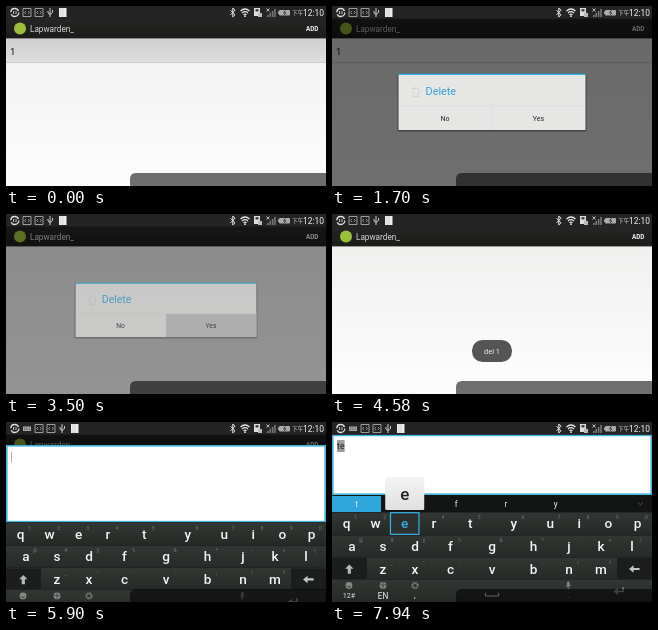
These frames come from a looping animation (320 px wide and 180 px high, 8 s). An HTML page:

```html
<!DOCTYPE html>
<html lang="en">
<head>
<meta charset="utf-8">
<title>Deleting and adding a user</title>
<style>
html, body { margin: 0; width: 100%; height: 100%; overflow: hidden; background: #000; }
svg { display: block; width: 100vw; height: 100vh; }
text { font-family: Roboto, "Noto Sans", sans-serif; }
</style>
</head>
<body>
<svg id="stage" viewBox="0 0 320 180" xmlns="http://www.w3.org/2000/svg"></svg>
<script>
const LOOP = 8000, STEP = 120, HOLD = 500;
const BLUE = "#33b5e5", COL = 320 / 11;

const rect = (x, y, w, h, fill, more = "") =>
  `<rect x="${x}" y="${y}" width="${w}" height="${h}" fill="${fill}" ${more}/>`;
const text = (x, y, size, fill, str, more = "") =>
  `<text x="${x}" y="${y}" font-size="${size}" fill="${fill}" ${more}>${str}</text>`;
const mid = (x, y, size, fill, str, more = "") =>
  text(x, y, size, fill, str, `text-anchor="middle" ${more}`);
const line = (d, color, width = 1, more = "") =>
  `<path d="${d}" fill="none" stroke="${color}" stroke-width="${width}" ${more}/>`;
const shape = (d, fill) => `<path d="${d}" fill="${fill}"/>`;
const group = (id, body, more = "") => `<g id="${id}" ${more}>${body}</g>`;
const grad = (id, from, to) =>
  `<linearGradient id="${id}" x2="0" y2="1"><stop stop-color="${from}"/><stop offset="1" stop-color="${to}"/></linearGradient>`;

function codeIcon(x) {
  return line(`M${x} 2.5h8v8h-8z`, "#aaa", .9) +
    line(`M${x + 3} 5l-1.5 1.5l1.5 1.5M${x + 5} 5l1.5 1.5l-1.5 1.5`, "#aaa", .8);
}

function statusBar() {
  const notices = codeIcon(17) + codeIcon(29) +
    line("M44 2v9M42 5v2l2 1.5M46.5 4v2.5l-2.5 2", "#ddd", .9) +
    rect(53, 2, 7.5, 9, "#eee") + line("M55 2v9M57 2v9", "#aaa", .4);
  const keyIcon = rect(17, 4.5, 8, 4.5, "#aaa") +
    line("M18 5.9h6M18 7.5h6", "#444", .7, 'stroke-dasharray="1 .7"');
  return rect(0, 0, 320, 12.6, "#232423") +
    `<circle cx="8.8" cy="6.5" r="4" fill="none" stroke="#ddd" stroke-width="1.4" stroke-dasharray="10.5 2"/>` +
    line("M7.6 5v3M10 5v3", "#ddd", .9) +
    group("notices", notices) + group("keyIcon", keyIcon) +
    line("M224.5 4.2l4.5 4.6l-2.2 2.2v-9l2.2 2.2l-4.5 4.6", "#e8e8e8", 1) +
    line("M234.5 5q4.5-4 9 0M236 7q3-2.6 6 0M237.6 8.8q1.4-1.2 2.8 0", "#e8e8e8", 1.2) +
    `<circle cx="239" cy="10.2" r=".9" fill="#e8e8e8"/>` +
    rect(248, 2, 6, 8, "#ddd") + rect(249.5, 3.2, 3, 2.2, "#333") + rect(252, 7, 4, 4, "#bbb") +
    line("M260.5 2.5l3 3M263.5 2.5l-3 3", "#ddd", .8) +
    [0, 1, 2, 3].map(i => rect(261 + i * 2.4, 9 - i * 2, 1.6, 2 + i * 2, "#777")).join("") +
    rect(273, 4, 11, 5.5, "#aaa", 'rx="1"') + rect(272, 5.5, 1, 2.5, "#aaa") +
    line("M279.5 4.2l-2 2.6h2.4l-1.8 2.4", "#222", .8) +
    text(286.3, 9, 5.4, "#ddd", "下午", `style="font-family:'Noto Sans CJK SC','Noto Sans CJK',sans-serif"`) +
    text(297, 10, 8.4, "#f2f2f2", "12:10");
}

function listScreen() {
  return rect(0, 32, 320, 148, "url(#page)") +
    group("row", rect(0, 32, 320, 25, "url(#press)", 'id="press1"') +
      rect(0, 56.3, 320, .7, "#c4c4c4") + text(4, 48.5, 9.5, "#111", "1")) +
    rect(0, 12, 320, 20.4, "url(#bar)") +
    rect(292, 13, 28, 19.4, "#777", 'id="addPress"') +
    `<circle cx="14" cy="22.5" r="6" fill="#9bbf3b"/>` +
    text(24, 25.6, 8.2, "#d6d6d6", "Lapwarden_") +
    text(300, 25.3, 6.3, "#f4f4f4", "ADD", 'font-weight="700"');
}

function deleteDialog() {
  return rect(65.5, 67.5, 189, 58, "#000", 'opacity=".4" rx="1"') +
    rect(66.5, 68, 187, 56, "#e6e7e5") + rect(66.5, 67.6, 187, 1.4, BLUE) +
    line("M80 82.5h7M81 84l.8 6.5h4.4l.8-6.5M82.5 81.5h2", "#d4d4d4", 1) +
    text(93.6, 89.2, 10.8, "#31a4d4", "Delete") +
    rect(160, 100, 93.5, 24, "#bdbdbd", 'id="yesPress"') +
    rect(66.5, 99.6, 187, .6, "#d8d8d8") + rect(159.7, 100, .6, 24, "#d8d8d8") +
    mid(113, 115, 7, "#222", "No") + mid(206.5, 115, 7, "#222", "Yes");
}

function addDialog() {
  return rect(18.8, 36.5, 282.4, 120, "#000", 'opacity=".28" rx="1.5"') +
    rect(20, 37.5, 280, 117.5, "#f5f5f5", 'rx="1"') +
    text(28, 57.5, 11.1, "#33a9d8", "ADD NEW USER") +
    rect(20, 68.4, 280, 1.3, BLUE) +
    text(20, 95, 10.9, "#111", "User Name") +
    line("M21.7 111.8v3.4h276.6v-3.4", BLUE, 1.1) +
    rect(22, 120, 276, 19.5, "#c6c6c6") + rect(22, 138.8, 276, .8, "#aaa");
}

// key centres mirror around the middle of the screen, with wider keys there
const mirror = half => [...half.map(d => 160 - d), ...half.reverse().map(d => 160 + d)];
const TOP = mirror([5, 4, 3, 2, .75].map(n => n * COL));
const LOW = mirror([140, 109, 77, 41.5, 0]);

function keyRow(letters, xs, base, hints) {
  return [...letters].map((c, i) =>
    mid(xs[i], base, 13.6, "#f4f4f4", c, 'font-weight="500"') +
    mid(xs[i] + 9, base - 9, 5, "#777", hints[i])).join("");
}

function keyboard() {
  const rows = [90, 113, 135, 157].map(y =>
    rect(0, y, 320, 23, "url(#keys)") + rect(0, y, 320, .6, "#1a1c1b")).join("");
  const dim = "#858885";
  return rows + rect(0, 136, 35, 21, "#1b1e1c") + rect(285, 136, 35, 21, "#1b1e1c") +
    keyRow("qwertyuiop", TOP, 106.3, "1234567890") +
    keyRow("asdf", LOW, 128.5, "@#$%") + keyRow("ghjkl", LOW.slice(5), 128.5, "&*-+(") +
    keyRow("zxc", LOW.slice(1), 151.5, "_\"'") + keyRow("vbnm", LOW.slice(5), 151.5, ":;!?") +
    shape("M17.3 142.5l4.2 4.3h-2.6v5h-3.2v-5h-2.6z", "#b8bab8") +
    shape("M297 147l4.6-3.8v2.7h6v2.2h-6v2.7z", "#c4c6c4") +
    `<circle cx="17" cy="163.5" r="3.4" fill="${dim}"/>` + line("M15.3 164.4q1.7 1.5 3.4 0", "#222", .8) +
    mid(17, 176, 7.2, "#ddd", "12#") +
    `<circle cx="51" cy="163.5" r="3.4" fill="${dim}"/>` +
    line("M48 162.5q3 2 6 0M51 160.5v6", "#333", .7) + mid(51, 177.3, 8.2, "#eee", "EN") +
    `<circle cx="83" cy="163.5" r="2.6" fill="none" stroke="${dim}" stroke-width="2" stroke-dasharray="1.3 .74"/>` +
    mid(83, 176, 9, "#ddd", ",") +
    line("M153.5 171v3h13v-3", "#d8d8d8", 1.2) +
    rect(235, 159.5, 2.6, 5, dim, 'rx="1.3"') + line("M233.7 163q2.6 4.6 5.2 0M236.3 165.5v2", dim, .8) +
    mid(236.3, 176, 9, "#ddd", ".") +
    line("M291 165.5v4h-7", "#999", 1.5) + shape("M281.5 169.5l4.5-3.2v6.4z", "#999");
}

function editor() {
  const bar = rect(0, 73, 320, 17, "#131514") + rect(0, 74, 49, 16, "#2fa6dc") +
    [..."tgfry"].map((c, i) => mid(24.5 + i * 49.8, 85, 8.2, "#eee", c)).join("") +
    line("M306 80.5l2.4 2.4l2.4-2.4", "#555", 1);
  return rect(0, 12.6, 320, 167.4, "#222") + rect(0, 12.6, 320, 77.4, "#40b4dc") +
    rect(1.6, 14.2, 316.8, 74.2, "#fff", 'id="paper"') +
    rect(5, 18, 7, 12, "#9c9c9c", 'id="mark"') + text(5, 27.3, 8.8, "#222", "", 'id="typed"') +
    rect(5, 19, .8, 11, "#a89c9c", 'id="caret"') +
    keyboard() + group("bar", bar) +
    group("popup", rect(-COL / 2 + .3, 90.7, COL - .6, 21.6, "#2c302e", `stroke="${BLUE}" stroke-width="1.2"`) +
      mid(0, 106.3, 13.6, BLUE, "", 'id="keyChar" font-weight="500"') +
      rect(-19.5, 55, 39, 33, "url(#pop)", 'rx="1.5"') +
      mid(0, 78, 17, "#222", "", 'id="popChar" font-weight="500"'));
}

const stage = document.getElementById("stage");
stage.innerHTML = "<defs>" +
  grad("page", "#f0f1ef", "#fdfdfd") + grad("press", "#cfcfcf", "#dedede") +
  grad("bar", "#262725", "#1b1c1a") + grad("keys", "#333734", "#262a27") +
  grad("pop", "#f4f4f4", "#e0e0e0") + "</defs>" +
  listScreen() + rect(0, 12, 320, 168, "#000", 'id="dim"') +
  group("delBox", deleteDialog()) + group("addBox", addDialog()) +
  group("toast", rect(140, 126, 40, 22, "#555", 'rx="10.5"') + mid(160, 139.8, 7.4, "#f0f0f0", "del 1")) +
  group("ime", editor()) +
  `<path d="M124 180v-7q0-6 6-6h190v13z" fill="#000" opacity=".56"/>` +
  statusBar();

const el = {};
stage.querySelectorAll("[id]").forEach(n => el[n.id] = n);

const clamp = v => Math.max(0, Math.min(1, v));
const ramp = (t, a, b) => clamp((t - a) / (b - a));
const span = (t, a, b) => t >= a && t < b;
const fade = (n, v) => n.setAttribute("opacity", v);
const show = (n, on) => n.setAttribute("visibility", on ? "inherit" : "hidden");

function grow(n, s, cx, cy) {
  n.setAttribute("transform", `translate(${cx} ${cy}) scale(${s}) translate(${-cx} ${-cy})`);
}

function draw(now) {
  const t = now < HOLD ? 0 : HOLD + Math.floor((now - HOLD) / STEP) * STEP;

  fade(el.press1, 1 - .12 * ramp(t, 500, 1220));
  show(el.press1, t < 1340);
  show(el.row, t < 3500);
  show(el.addPress, span(t, 4700, 4940));

  const delDim = ramp(t, 1280, 1640) * (1 - ramp(t, 3380, 3860));
  const addDim = ramp(t, 4820, 5180);
  fade(el.dim, .56 * Math.max(delDim, addDim));

  const delIn = ramp(t, 1220, 1400), delOut = ramp(t, 3380, 3740);
  fade(el.delBox, delIn * (1 - delOut));
  grow(el.delBox, 1 - .1 * delOut, 160, 96);
  show(el.yesPress, span(t, 3140, 3620));

  const addIn = ramp(t, 4820, 5180);
  fade(el.addBox, addIn);
  grow(el.addBox, .9 + .1 * addIn, 160, 96);

  fade(el.toast, ramp(t, 3500, 3860) * (1 - ramp(t, 5180, 5660)));

  const slide = ramp(t, 5540, 6020);
  fade(el.ime, clamp(slide * 2));
  el.ime.setAttribute("transform", `translate(0 ${167 * (1 - slide) ** 2})`);
  show(el.keyIcon, t >= 5780);
  el.notices.setAttribute("transform", `translate(${t >= 5780 ? 12 : 0} 0)`);

  const typed = t >= 7820 ? "te" : t >= 7100 ? "t" : "";
  el.typed.textContent = typed;
  show(el.mark, typed);
  el.mark.setAttribute("width", typed.length > 1 ? 7.6 : 3);
  show(el.caret, !typed && (t - 5900) % 1000 < 500 === t < 6500 || span(t, 6740, 7100));
  show(el.bar, t >= 7220);
  el.paper.setAttribute("height", t >= 7220 ? 57.2 : 74.2);

  const key = span(t, 7100, 7340) ? "t" : t >= 7820 ? "e" : "";
  show(el.popup, key);
  el.popChar.textContent = el.keyChar.textContent = key;
  el.popup.setAttribute("transform", `translate(${TOP[key === "t" ? 4 : 2]} 0)`);
}

function tick() {
  draw(performance.now() % LOOP);
  requestAnimationFrame(tick);
}
draw(0);
requestAnimationFrame(tick);
</script>
</body>
</html>
```
